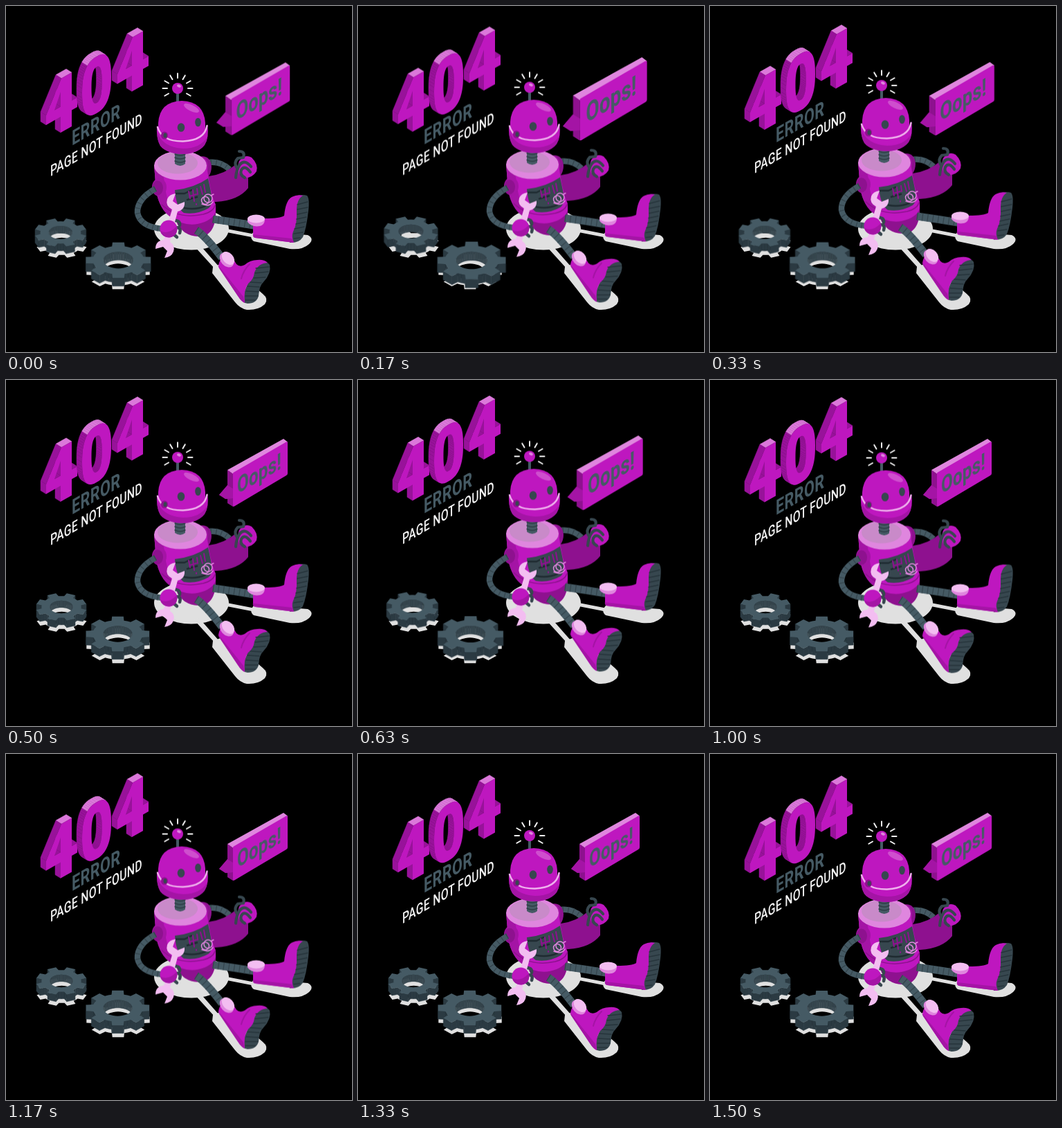
Write an HTML page that moves like this. It is 500 px wide and 500 px high and loops after 1540 ms.

```html
<!DOCTYPE html>
<html lang="en">
<head>
<meta charset="utf-8">
<title>404 robot</title>
<style>
  html, body { margin: 0; width: 100%; height: 100%; overflow: hidden; background: #000; }
  svg { display: block; width: 100vw; height: 100vh; }
  .a { fill: #be17bf; }
  .b { fill: #8e118f; }
  .c { fill: #a414a5; }
  .l { fill: #df86de; }
  .p { fill: #f3bdf1; }
  .s { fill: #455a64; }
  .d { fill: #37474f; }
  .w { fill: #e0e0e0; }
  .line { fill: none; stroke-linecap: round; stroke-linejoin: round; }
  .hose { fill: none; stroke: #455a64; stroke-width: 11; }
  .thin { stroke-width: 8.5; }
  .rings { stroke: #34444c; stroke-dasharray: 1.2 6.5; }
  .soles { stroke: #26343b; stroke-width: 1.3; }
  text { font-family: Roboto, Inter, sans-serif; font-weight: 700; }
  .float { animation: float 1540ms cubic-bezier(.37, 0, .63, 1) -40ms infinite; }
  .beat { animation: beat 1540ms linear -40ms infinite; }
  #gears { --k: 1.095; transform-origin: 126px 358px; }
  #bubble { --k: 1.28; transform-origin: 360.5px 133px; }
  #oops { --k: 1.18; transform-origin: 366px 136px; }
  @keyframes float { 50% { transform: translateY(-9px); } }
  @keyframes beat {
    0%, 30%, 40%, 60%, 100% { transform: scale(1); }
    10%, 50% { transform: scale(var(--k)); }
  }
</style>
</head>
<body>
<svg viewBox="0 0 500 500">
  <g id="shade" class="w">
    <ellipse cx="268" cy="322" rx="54" ry="30.5"/>
    <path d="M314 321L360 330V335L314 326Z"/>
    <path d="M359 325L436 331Q446 336 438 344Q428 353 410 351L358 340Q350 334 359 325Z"/>
    <path d="M272 347L279 344L308 377L302 380Z"/>
    <path d="M299 377L318 370L371 416Q380 423 374 431Q364 440 348 439Q338 437 331 428L298 386Z"/>
  </g>

  <g id="gears" class="beat"></g>

  <g class="float">
    <g id="digits"></g>
    <text class="s" font-size="30" letter-spacing=".6" transform="matrix(.72 -.416 0 1 95 202)">ERROR</text>
    <text fill="#f2f2f2" font-size="22" letter-spacing=".4" style="font-weight:500" transform="matrix(.72 -.416 0 1 64 246.5)">PAGE NOT FOUND</text>
  </g>

  <g id="bubble" class="beat">
    <path class="b" d="M320 130L328 135V183L320 178V172L308 166L320 152Z"/>
    <path class="c" d="M308 166L320 152L328 157V171L317 172Z"/>
    <path class="l" d="M320 130L401 85L407 89.5L328 135.5Z"/>
    <path class="a" d="M328 135Q328 134 329 133.5L405 89.5Q407 88.5 407 91V135Q407 137 405 138L330 182.5Q328 183.5 328 182Z"/>
  </g>
  <g id="oops" class="beat">
    <text class="s" font-size="34" transform="matrix(.72 -.416 0 1 334 165)">Oops!</text>
  </g>

  <g id="robot" class="float">
    <!-- far arm -->
    <path class="hose thin" d="M288 227Q308 222 323 236"/>
    <path class="b" d="M278 218Q295 214 297 232Q297 240 293 246Q316 243 332 229L350 247V263Q336 281 304 283L282 284Z"/>
    <path class="c" d="M278 218Q290 216 292 230Q292 240 284 243Z"/>
    <path class="a" d="M337 224Q345 213 355 219Q365 229 362 239Q355 250 342 248Q331 240 337 224Z"/>
    <g class="line" stroke="#37474f" stroke-width="4.2">
      <path d="M337 210Q346 210 343 219L335 220Q329 226 333 233"/>
      <path d="M354 232Q345 221 338 229Q333 236 332 248"/>
      <path d="M353 240Q345 229 340 237Q337 244 345 248"/>
    </g>

    <!-- legs -->
    <path class="b" d="M242 300L303 290Q305 320 291 330Q274 337 258 327Q246 318 242 300Z"/>
    <path class="hose" d="M299 308Q328 312 358 317"/>
    <path class="hose" d="M275 324Q289 333 312 364"/>

    <path class="d" d="M414 276Q428 271 435 274Q439 278 437 296Q434 322 429 334Q423 343 410 342Z"/>
    <path class="a" d="M357 315L374 307Q396 307 402 303Q404 281 413 276Q421 272 429 274Q420 279 420 296Q421 315 415 326Q412 333 416 342L360 335Q356 334 357 329Z"/>
    <path class="c" d="M357 330L413 336L416 342L360 335Q356 334 357 330Z"/>
    <path class="line soles" d="M421 287L436 283M421 294L436 291M421 301L435 298M420 308L434 305M419 315L433 312M417 322L431 319M416 329L429 327M416 336L425 335"/>
    <path class="l" d="M349 308V312Q355 320 367 318Q374 316 374 308Z"/>
    <ellipse class="p" cx="361.5" cy="307.5" rx="12.5" ry="6"/>

    <path class="d" d="M363 371Q376 367 381 374Q384 386 372 399Q366 404 365 419Q362 430 349 430Q340 429 341 420Z"/>
    <path class="a" d="M308 371Q312 357 325 360L333 373Q338 378 345 374Q353 367 363 367Q373 366 378 371Q364 372 359 385Q358 395 350 401Q343 410 345 429Q340 427 335 419L309 380Q306 376 308 371Z"/>
    <path class="c" d="M306 374L343 420L345 429Q340 427 335 419L308 379Z"/>
    <path class="line" stroke="#a414a5" stroke-width="2" d="M352 373Q343 382 340 394"/>
    <path class="line soles" d="M361 379L380 377M360 386L379 384M358 393L375 392M353 399L369 400M349 405L366 406M347 412L365 413M346 419L364 419M346 425L360 425"/>
    <ellipse class="l" cx="319" cy="367" rx="12" ry="8.5" transform="rotate(48 319 367)"/>
    <ellipse class="p" cx="321" cy="364.5" rx="11" ry="7.5" transform="rotate(48 321 364.5)"/>

    <!-- body -->
    <path class="a" d="M214 230L217 268Q222 294 238 305Q262 322 287 312Q303 305 303 294V287Q295 270 290 230Z"/>
    <path class="c" d="M214 230L217 268Q222 294 238 305L248 311Q232 290 228 248Z"/>
    <path class="line" stroke="#8e118f" stroke-width="1.5" d="M225 287Q249 309 285 301Q300 297 302 288"/>
    <path class="d" d="M244 266Q272 263 292 249L296 268Q300 286 293 292Q276 302 257 299Q246 292 244 266Z"/>
    <path class="line" stroke="#1f2b31" stroke-width="2.5" d="M246 271H258L268 266M262 280L276 276M258 292Q274 295 288 289"/>
    <path class="line" stroke="#8e118f" stroke-width="2" d="M264 268L266 278M270 266L272 282M276 264L277 272M281 261L284 272M286 258L288 269M275 286V287M265 275L275 272"/>
    <g class="line" stroke="#df86de" stroke-width="1.5">
      <circle cx="288" cy="281" r="5.5"/><circle cx="292" cy="278" r="6"/>
      <path d="M283 286Q294 291 299 283M296 274L300 272"/>
    </g>
    <ellipse class="l" cx="252" cy="230.5" rx="38" ry="21"/>
    <ellipse cx="248" cy="227" rx="29" ry="15.5" fill="#c98ac9"/>

    <!-- neck and head -->
    <path class="s" d="M244 206H259V228Q252 234 244 228Z"/>
    <path class="line" stroke="#2f3e46" stroke-width="1.5" d="M244 214Q252 218 259 214M244 219Q252 223 259 219M244 224Q252 228 259 224"/>
    <path class="line" stroke="#455a64" stroke-width="4" d="M248 125V143"/>
    <circle class="a" cx="248" cy="119" r="8"/>
    <ellipse class="l" cx="250" cy="115.5" rx="3" ry="2" transform="rotate(25 250 115.5)"/>
    <path id="rays" class="line" stroke="#f2f2f2" stroke-width="2"/>
    <path class="a" d="M220 180V169Q222 138 254 137Q286 138 288 169V180Q282 197 254 198Q226 197 220 180Z"/>
    <ellipse class="l" cx="268" cy="147.5" rx="12" ry="4.5" transform="rotate(26 268 147.5)" opacity=".5"/>
    <path class="a" d="M218 173Q223 196 256 195Q287 194 291 171Q294 190 287 201Q276 214 254 214Q232 213 223 202Q217 191 218 173Z"/>
    <path class="c" d="M218 181Q225 204 256 206Q281 206 291 189Q288 213 254 214Q232 213 223 202Q218 194 218 181Z"/>
    <path class="line" stroke="#efb0ed" stroke-width="2.5" d="M219 175Q225 196 256 195.5Q287 194 290.5 173"/>
    <ellipse class="b" cx="229" cy="187" rx="5" ry="5.5"/>
    <ellipse class="d" cx="230" cy="187" rx="2.5" ry="3.5"/>
    <ellipse class="d" cx="253" cy="175.5" rx="5.3" ry="6.3"/>
    <ellipse class="d" cx="277.5" cy="168" rx="4.3" ry="6.3"/>

    <!-- near arm with wrench -->
    <ellipse class="c" cx="221.5" cy="262" rx="10.5" ry="13"/>
    <ellipse class="b" cx="219" cy="263" rx="8" ry="10.5"/>
    <path class="hose thin" d="M216 264Q189 279 190 299Q194 319 226 322"/>
    <path class="line" stroke="#37474f" stroke-width="4.5" d="M242 310Q252 309 251 317M244 320Q254 319 251 328M240 328L247 334"/>
    <path class="p" d="M240 294Q230 289 233 279Q236 272 245 271L241 282L248 287L258 283Q259 294 248 297L243 316L234 314Z"/>
    <path class="p" d="M230 332L239 334L237 341Q245 346 242 355Q239 363 229 364L233 354L227 348L216 351Q216 339 228 338Z"/>
    <circle class="a" cx="235" cy="322" r="12.5"/>
    <path class="c" d="M223 325Q235 331 247 318Q249 333 236 334.5Q225 334 223 325Z"/>
  </g>
</svg>
<script>
  const $ = id => document.getElementById(id);
  const add = (parent, d, attrs) => {
    const p = document.createElementNS('http://www.w3.org/2000/svg', 'path');
    p.setAttribute('d', d);
    for (const k in attrs) p.setAttribute(k, attrs[k]);
    return parent.appendChild(p);
  };
  const poly = pts => 'M' + pts.map(p => p.map(v => v.toFixed(2))).join('L') + 'Z';
  const ring = (n, fn) => Array.from({ length: n }, (_, i) => fn(i / n * 2 * Math.PI));

  // Outer loops run clockwise, holes counter-clockwise.
  // sideColor gets the side's vertical normal and its relative height (0 = top).
  function extrude(parent, loops, [ex, ey], face, sideColor) {
    const ys = loops[0].map(p => p[1]);
    const top = Math.min(...ys), height = Math.max(...ys) - top;
    for (const [n, loop] of loops.entries()) {
      loop.forEach((p, i) => {
        const q = loop[(i + 1) % loop.length];
        const nx = q[1] - p[1], ny = p[0] - q[0];
        if (nx * ex + ny * ey <= 0) return;
        const level = ((p[1] + q[1]) / 2 - top) / height;
        const fill = sideColor(ny / Math.hypot(nx, ny), level, n > 0);
        add(parent, poly([p, q, [q[0] + ex, q[1] + ey], [p[0] + ex, p[1] + ey]]),
          { fill, stroke: fill, 'stroke-width': .5 });
      });
    }
    add(parent, loops.map(poly).join(''), { fill: face, 'fill-rule': 'evenodd' });
  }

  // Digits
  const four = [
    [[80, 104.5], [95, 96], [95, 136.5], [103, 132], [103, 146], [95, 150.5], [95, 174],
     [79, 183], [79, 160], [58, 172], [58, 158]],
    [[79, 124], [70, 150.5], [79, 145.5]]
  ];
  const oval = (a, b, dir) => ring(64, t => {
    const pw = v => Math.sign(v) * Math.abs(v) ** .78;
    const x = a * pw(Math.cos(t)), y = b * pw(Math.sin(t * dir));
    return [131 + x, 114 + y - .577 * x];
  });
  const shift = (loops, x, y) => loops.map(l => l.map(p => [p[0] + x, p[1] + y]));
  const digitSide = (ny, level) => ny < -.5 && level < .35 ? '#db78da' : '#98129a';
  for (const loops of [four, [oval(21, 41, 1), oval(7.5, 26, -1)], shift(four, 103, -59.5)])
    extrude($('digits'), loops, [-8, -5], '#be17bf', digitSide);

  // Gears
  const tilt = .55;
  function gear(cx, cy, r, turn) {
    const at = (rad, t) => [cx + rad * Math.cos(t), cy + rad * tilt * Math.sin(t)];
    const outer = ring(8, t => t + turn).flatMap(t => [
      at(r * .79, t - .25), at(r * 1.01, t - .18), at(r * 1.01, t + .18), at(r * .79, t + .25),
      at(r * .79, t + Math.PI / 8)
    ]);
    return [outer, ring(40, t => at(r * .46, -t))];
  }
  const gearSide = (ny, level, hole) => hole ? '#37474f' : '#2b3a42';
  const specs = [[80, 328, 36.5, Math.PI / 8, 10, 16], [161.5, 367, 46, 0, 11.5, 17]];
  for (const [x, y, r, turn, depth, drop] of specs) {
    add($('shade'), gear(x + .5, y + drop, r, turn).map(poly).join(''), { 'fill-rule': 'evenodd' });
    extrude($('gears'), gear(x, y, r, turn), [0, depth], '#455a64', gearSide);
  }

  // Antenna rays
  let rays = '';
  for (let i = -4; i <= 4; i++) {
    const t = i * Math.PI / 6, x = Math.sin(t), y = -Math.cos(t);
    rays += `M${248 + 15 * x} ${119 + 15 * y}L${248 + 21.5 * x} ${119 + 21.5 * y}`;
  }
  $('rays').setAttribute('d', rays);

  // Hose rings
  for (const hose of document.querySelectorAll('.hose')) {
    const copy = hose.cloneNode();
    copy.classList.add('rings');
    hose.after(copy);
  }
</script>
</body>
</html>
```
